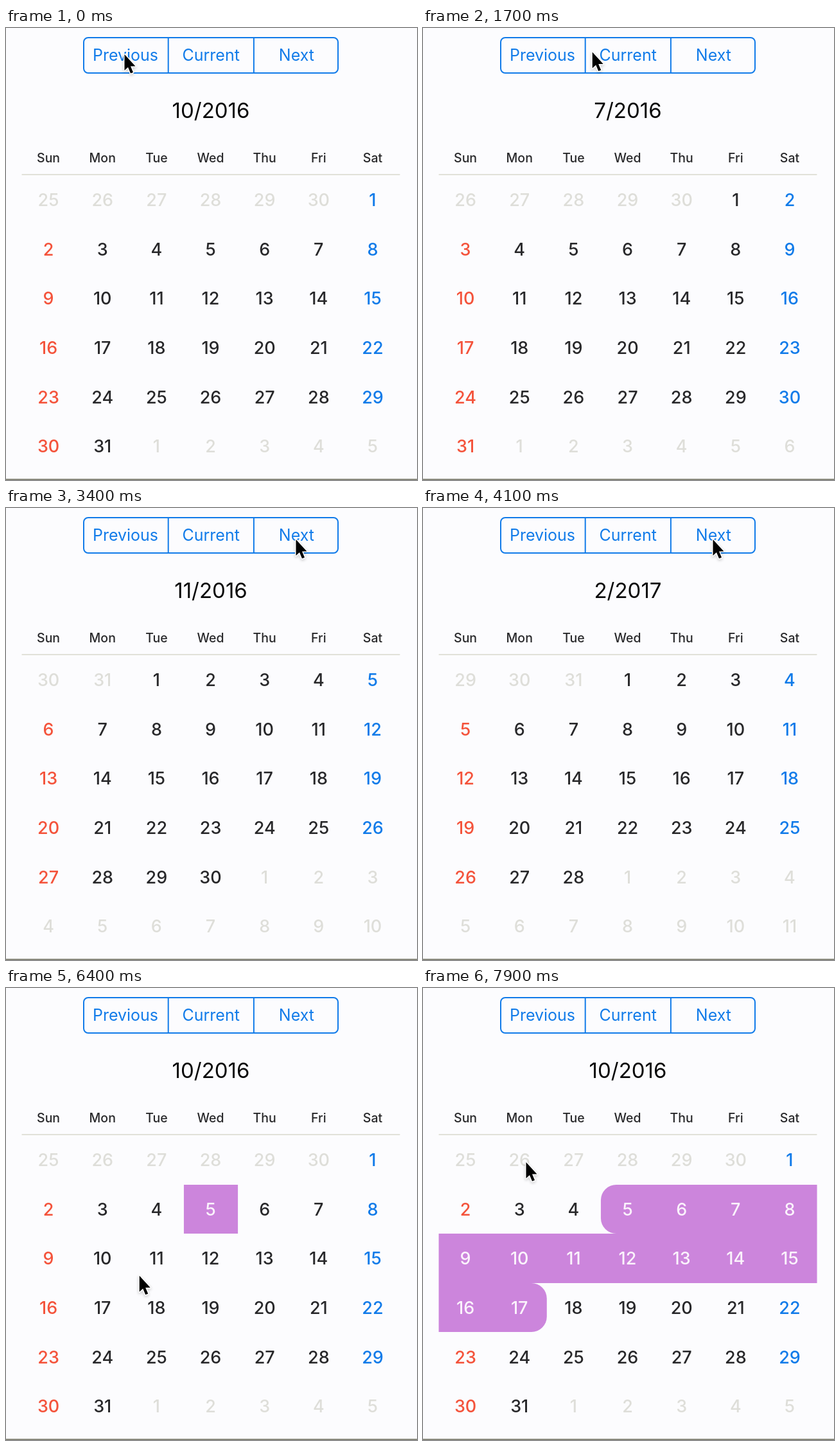
These frames come from a looping animation (640 by 703 pixels, 8 s). An HTML page with a canvas:

```html
<!DOCTYPE html>
<html lang="en">
<head>
<meta charset="utf-8">
<title>Calendar</title>
<style>
html, body { margin: 0; width: 100%; height: 100%; overflow: hidden; background: #fcfcfe; }
canvas { display: block; }
</style>
</head>
<body>
<canvas id="stage" width="640" height="703"></canvas>
<script>
const ctx = document.getElementById('stage').getContext('2d');
const LOOP = 8000, TRAVEL = 645;
const LEFT = 24.5, TOP = 229, COL = 84.15, ROW = 76.55;
const BLUE = '#117be9', RED = '#f4533b', INK = '#28282a', FAINT = '#deded9', PURPLE = '#cc85dc';
const DAYS = ['Sun', 'Mon', 'Tue', 'Wed', 'Thu', 'Fri', 'Sat'];
const BUTTONS = ['Previous', 'Current', 'Next'];

// Where the pointer rests, and when it leaves for the next place
const stops = [
  { x: 184, y: 40, leave: 1400 },
  { x: 360, y: 32, leave: 2600 },
  { x: 451, y: 48, leave: 4300 },
  { x: 316, y: 64, leave: 5200 },
  { x: 324, y: 344, leave: 6000 },
  { x: 152, y: 495, leave: 7000 },
  { x: 160, y: 270, leave: LOOP },
];

// Months away from October 2016: steps back, reset, steps forward, reset
function monthOffset(t) {
  if (t < 2100) return -Math.min(3, Math.floor(t / 450));
  if (t < 3150 || t >= 4950) return 0;
  return Math.min(4, 1 + Math.floor((t - 3150) / 310));
}

function pointerAt(t) {
  const i = stops.findIndex(s => t < s.leave), to = stops[i], from = stops[i - 1] || to;
  const k = i ? Math.min(1, (t - from.leave) / TRAVEL) : 1;
  const ease = k * k * (3 - 2 * k);
  return [from.x + (to.x - from.x) * ease, from.y + (to.y - from.y) * ease];
}

function text(str, x, y, size, weight, color) {
  ctx.font = `${weight} ${size}px Inter, "Open Sans", sans-serif`;
  ctx.fillStyle = color;
  ctx.fillText(str, x, y);
}

function line(x1, y1, x2, y2, color, width) {
  ctx.strokeStyle = color;
  ctx.lineWidth = width;
  ctx.beginPath();
  ctx.moveTo(x1, y1);
  ctx.lineTo(x2, y2);
  ctx.stroke();
}

function drawButtons() {
  ctx.strokeStyle = BLUE;
  ctx.lineWidth = 2;
  ctx.beginPath();
  ctx.roundRect(121, 15, 396, 55, 7);
  ctx.stroke();
  BUTTONS.forEach((label, i) => {
    const x = 186 + i * 133.2;
    text(label, x, 51.3, 25, 400, BLUE);
    if (i) line(x - 66.5, 15, x - 66.5, 70, BLUE, 2);
  });
}

// Fill the cells first..last, one bar per week row
function drawRange(first, last) {
  const round = first === last ? 0 : 24;
  ctx.fillStyle = PURPLE;
  for (let row = Math.floor(first / 7); row <= Math.floor(last / 7); row++) {
    const a = Math.max(first, row * 7), b = Math.min(last, row * 7 + 6);
    const x = LEFT + a % 7 * COL, y = Math.round(TOP + row * ROW);
    const l = a === first ? round : 0, r = b === last ? round : 0;
    ctx.beginPath();
    ctx.roundRect(x, y, (b - a + 1) * COL, Math.round(TOP + (row + 1) * ROW) - y, [l, r, r, l]);
    ctx.fill();
  }
}

function drawMonth(offset, first, last) {
  const start = new Date(2016, 9 + offset, 1);
  const year = start.getFullYear(), month = start.getMonth(), lead = start.getDay();
  text(`${month + 1}/${year}`, 319, 139.5, 33, 400, '#080808');
  if (first) drawRange(lead + first - 1, lead + last - 1);
  for (let i = 0; i < 42; i++) {
    const day = i - lead + 1, date = new Date(year, month, day), col = i % 7;
    const color = date.getMonth() !== month ? FAINT
      : first && day >= first && day <= last ? '#fbf3fc'
      : col === 0 ? RED : col === 6 ? BLUE : INK;
    text(date.getDate(), LEFT + (col + 0.5) * COL - 0.5, 277.3 + Math.floor(i / 7) * ROW, 27, 500, color);
  }
}

function drawPointer(x, y) {
  const arrow = new Path2D('M0 0V25L5.5 20L9.5 29.5L13.5 28L9.5 18.5H17Z');
  ctx.save();
  ctx.translate(x + 0.5, y + 1);
  ctx.lineJoin = 'round';
  ctx.lineWidth = 3;
  ctx.strokeStyle = '#fff';
  ctx.shadowColor = 'rgba(0, 0, 0, 0.2)';
  ctx.shadowBlur = 4;
  ctx.shadowOffsetY = 2;
  ctx.stroke(arrow);
  ctx.shadowColor = 'transparent';
  ctx.fillStyle = '#000';
  ctx.fill(arrow);
  ctx.restore();
}

function draw(now) {
  const t = now % LOOP;
  ctx.fillStyle = '#fcfcfe';
  ctx.fillRect(0, 0, 640, 703);
  ctx.textAlign = 'center';
  drawButtons();
  DAYS.forEach((day, i) => text(day, LEFT + (i + 0.5) * COL - 0.5, 209, 19.5, 500, INK));
  line(LEFT, 228, 613.5, 228, '#d9d9cc', 1.5);
  drawMonth(monthOffset(t), t >= 5900 ? 5 : 0, t >= 6750 ? 17 : 5);
  line(0, 702, 640, 702, '#8c8c80', 2);
  drawPointer(...pointerAt(t));
  requestAnimationFrame(() => draw(performance.now()));
}

draw(0);
</script>
</body>
</html>
```
